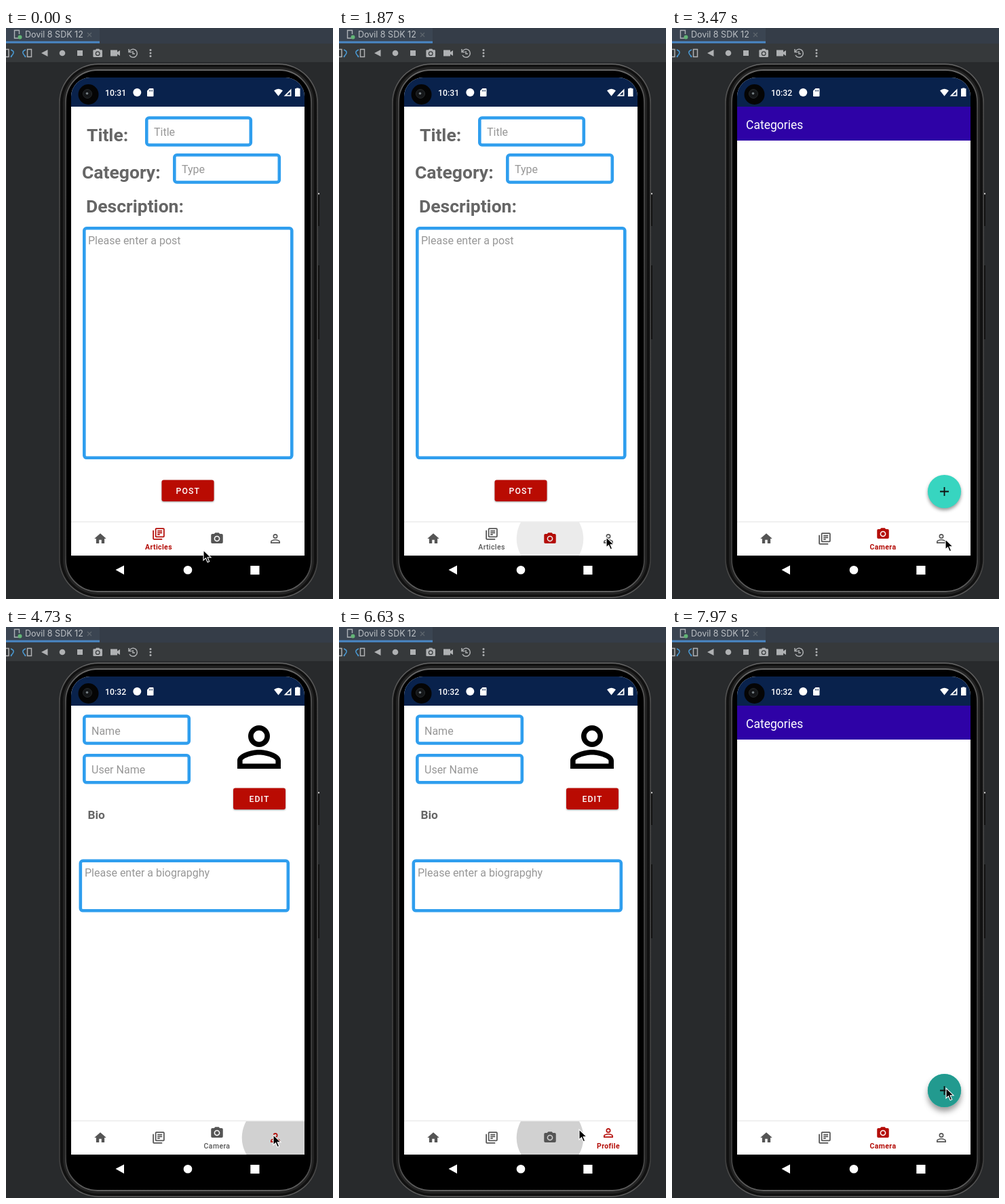
An HTML page for the animation above (8000 ms loop, 482 by 842 pixels).

```html
<!DOCTYPE html>
<html lang="en">
<head>
<meta charset="utf-8">
<title>Phone emulator</title>
<style>
  html, body { margin: 0; width: 100%; height: 100%; overflow: hidden; background: #282a2c; }
  svg { display: block; width: 100%; height: 100%; }
  text { font-family: Roboto, sans-serif; white-space: pre; }
  .heading { font-weight: 700; font-size: 26.5px; fill: #666; }
  .hint { font-size: 16px; fill: #979797; }
  .field { fill: none; stroke: #2f9eee; stroke-width: 4.6; }
  .button { fill: #b90b02; filter: drop-shadow(0 1.5px 1.2px #0006); }
  .button-text { font-weight: 500; font-size: 12.25px; letter-spacing: 1.09px; fill: #fff; }
  .label { font-size: 10.5px; letter-spacing: .38px; text-anchor: middle; }
</style>
</head>
<body>
<svg viewBox="0 0 482 842" preserveAspectRatio="none">
  <defs>
    <linearGradient id="rim" x1="0" y1="0" x2="0" y2="1">
      <stop offset="0" stop-color="#686868"/><stop offset=".08" stop-color="#484848"/>
      <stop offset=".93" stop-color="#3c3c3c"/><stop offset="1" stop-color="#606060"/>
    </linearGradient>
    <clipPath id="screenClip"><path d="M96 778V101a28 28 0 0 1 28-28H412a28 28 0 0 1 28 28V778z"/></clipPath>
    <clipPath id="navClip"><path d="M96 729H440V778H96z"/></clipPath>
    <clipPath id="fabClip"><circle cx="401.5" cy="683.5" r="24.6"/></clipPath>
    <path id="person" fill-rule="evenodd" d="M12 5.9a2.1 2.1 0 1 1 0 4.2a2.1 2.1 0 0 1 0-4.2m0 9c2.97 0 6.1 1.46 6.1 2.1v1.1H5.9V17c0-.64 3.13-2.1 6.1-2.1M12 4a4 4 0 1 0 0 8a4 4 0 0 0 0-8zm0 9c-2.67 0-8 1.34-8 4v3h16v-3c0-2.66-5.33-4-8-4z"/>
    <path id="home" d="M10 20v-6h4v6h5v-8h3L12 3 2 12h3v8z"/>
    <path id="articles" fill-rule="evenodd" d="M4 6H2v14a2 2 0 0 0 2 2h14v-2H4zM20 2H8a2 2 0 0 0-2 2v12a2 2 0 0 0 2 2h12a2 2 0 0 0 2-2V4a2 2 0 0 0-2-2zm0 14H8V4h12zM10 9h8v2h-8zm0 3h4v2h-4zm0-6h8v2h-8z"/>
    <path id="camera" fill-rule="evenodd" d="M9 2L7.17 4H4a2 2 0 0 0-2 2v12a2 2 0 0 0 2 2h16a2 2 0 0 0 2-2V6a2 2 0 0 0-2-2h-3.17L15 2zm3 5a5 5 0 1 1 0 10a5 5 0 0 1 0-10zm0 1.8a3.2 3.2 0 1 0 0 6.4a3.2 3.2 0 0 0 0-6.4z"/>
  </defs>

  <!-- Tool window -->
  <path fill="#282a2c" d="M0 0H482V842H0z"/>
  <path fill="#353d48" d="M0 0H482V23H0z"/>
  <path fill="#3b4552" d="M0 0H138V20H0z"/>
  <path fill="#4a87c5" d="M0 19.5H138V22.5H0z"/>
  <path fill="#36393b" d="M0 23H482V51H0z"/>
  <path fill="#252729" d="M0 50.5H482V51.5H0z"/>
  <path fill="none" stroke="#aeb3b8" stroke-width="1.4" d="M19 15H12.5V3.500H19.500V9"/>
  <circle cx="20.500" cy="13.500" r="3" fill="#62b476"/>
  <text x="28" y="14.200" style="font:12.5px Inter,sans-serif" fill="#bcc0c5">Dovil 8 SDK 12</text>
  <path stroke="#5e666e" stroke-width="1.2" d="M120 7l6 6m0-6l-6 6"/>
  <g fill="none" stroke="#afb1b3" stroke-width="1.5">
    <path d="M-2 31.500H4V42.500H-2M31.500 31.500H37.500V42.500H31.500z"/>
    <path stroke="#4a9ad4" d="M7 32q5 2 4 5t-4 5M29 32q-5 2-4 5t4 5M9 41l-2 2M27 41l2 2"/>
    <path d="M182 34.500a6 6 0 1 1 0 5.500M181 31v4.500h4.500M187 34v4h3"/>
  </g>
  <g fill="#afb1b3">
    <path d="M52 37l9.500-5V42zM105 33h8v8h-8zM154 32.500h10v3l4-2.500v8l-4-2.500v3h-10z"/>
    <circle cx="83" cy="37" r="4.300"/>
    <use href="#camera" transform="translate(127 29.500) scale(.68)"/>
    <circle cx="213" cy="32.500" r="1.500"/><circle cx="213" cy="37" r="1.500"/><circle cx="213" cy="41.500" r="1.500"/>
  </g>

  <!-- Phone body -->
  <path fill="#111" d="M459 242h3v50h-3zM459 350h3v109h-3z"/>
  <path fill="#bbb" d="M460 243h2v2.500h-2z"/>
  <rect x="78" y="52.500" width="382" height="788" rx="58" fill="url(#rim)"/>
  <rect x="79.800" y="54" width="378.400" height="785" rx="56" fill="#111"/>
  <rect x="84" y="57.500" width="370" height="778" rx="52" fill="#232323"/>
  <rect x="88" y="62" width="362" height="769" rx="47" fill="#000" stroke="url(#rim)" stroke-width="1.800"/>

  <g clip-path="url(#screenClip)">
    <path fill="#fff" d="M96 73H440V778H96z"/>
    <path fill="#09224c" d="M96 73H440V116H96z"/>

    <g id="articlesScreen">
      <text class="heading" x="119" y="167">Title:</text>
      <text class="heading" x="112" y="221.500">Category:</text>
      <text class="heading" x="118" y="272">Description:</text>
      <rect class="field" x="207.300" y="132.500" width="153.500" height="40" rx="3.500"/>
      <rect class="field" x="248.300" y="187.300" width="154.500" height="40.200" rx="3.500"/>
      <rect class="field" x="115.300" y="295.300" width="306" height="338.500" rx="3.500"/>
      <text class="hint" x="218" y="159">Title</text>
      <text class="hint" x="259" y="214">Type</text>
      <text class="hint" x="121" y="319.300">Please enter a post</text>
      <rect class="button" x="229.500" y="666.500" width="77" height="31.500" rx="3"/>
      <text class="button-text" x="250.500" y="687">POST</text>
    </g>

    <g id="categoriesScreen">
      <path fill="#2e02a6" d="M96 116H440V166H96z"/>
      <text x="109" y="148.500" font-size="17.500" fill="#fff">Categories</text>
      <circle id="fab" cx="401.500" cy="683.500" r="24.600" fill="#37d5c0"/>
      <circle id="fabRipple" cx="404" cy="681" fill="#229a8f" clip-path="url(#fabClip)"/>
      <path stroke="#111" stroke-width="1.800" d="M395 683.500h13M401.500 677v13"/>
    </g>

    <g id="profileScreen">
      <rect class="field" x="115.300" y="131.500" width="154.500" height="40" rx="3.500"/>
      <rect class="field" x="115.300" y="189.300" width="154.500" height="40" rx="3.500"/>
      <rect class="field" x="109.800" y="344.800" width="306" height="73.500" rx="3.500"/>
      <text class="hint" x="126" y="158.500">Name</text>
      <text class="hint" x="126" y="216.300">User Name</text>
      <text class="hint" x="116" y="368.300">Please enter a biograpghy</text>
      <text x="120.500" y="283" font-size="17.300" font-weight="700" fill="#666">Bio</text>
      <use href="#person" transform="translate(325 129) scale(4)"/>
      <rect class="button" x="335" y="237.500" width="77" height="31.500" rx="3"/>
      <text class="button-text" x="358.500" y="258">EDIT</text>
    </g>

    <path fill="#ececec" d="M96 727.500H440V729H96z"/>
    <path fill="#fff" d="M96 729H440V778H96z"/>
    <g clip-path="url(#navClip)"><circle id="ripple" cy="753"/></g>
    <g id="tabs"></g>
  </g>

  <!-- Status and system bars -->
  <circle cx="121.500" cy="98" r="15" fill="#050505"/>
  <circle cx="120" cy="97" r="6.500" fill="#151719" stroke="#26292c"/>
  <circle cx="119.500" cy="96.500" r="1.800" fill="#747c80"/>
  <text id="clock" x="146" y="99.500" font-size="12.250" font-weight="500" fill="#fff"></text>
  <g fill="#fff">
    <circle cx="193.300" cy="95" r="6"/>
    <path fill-rule="evenodd" d="M211.500 89H216.500q1 0 1 1V100q0 1-1 1H209q-1 0-1-1V92.500zM211 91.500v2h1v-2zm2 0v2h1v-2zm2 0v2h1v-2z"/>
    <path d="M395 92.300q6.500-5 13 0L401.500 100.500zM420.500 89.500V100.500H409.500zM428 89.300V88.500h3.500v.800h2V101h-7.500V89.300z"/>
    <path fill="#09224c" d="M418.700 94V98.800H413.900z"/>
    <path d="M161.500 799L174 792.500V806zM360.300 793H373.500V806H360.300z"/>
    <circle cx="268" cy="799.300" r="6.300"/>
  </g>

  <path id="cursor" d="M0 0V15l3.500-3.300 2.600 6.100 2.600-1.100-2.600-6H11z" fill="#000" stroke="#fff" stroke-width="1.100"/>
</svg>

<script>
const LOOP = 8000;
const byId = id => document.getElementById(id);
const clamp = x => Math.max(0, Math.min(1, x));
const progress = (t, start, duration) => clamp((t - start) / duration);
const smooth = x => x * x * (3 - 2 * x);
const lastStarted = (events, t) => events.findLastIndex(e => e.at <= t);

const tabs = [["home", "Home"], ["articles", "Articles"], ["camera", "Camera"], ["person", "Profile"]]
  .map(([icon, label], i) => ({ icon, label, x: 139 + 86 * i }));
const selections = [{ at: -500, tab: 1 }, { at: 1860, tab: 2 }, { at: 4720, tab: 3 }, { at: 6740, tab: 2 }];
const screens = [
  { at: 0, id: "articlesScreen" }, { at: 1915, id: "categoriesScreen" },
  { at: 4710, id: "profileScreen" }, { at: 6760, id: "categoriesScreen" }
];
const ripples = [
  { at: 1620, release: 1780, tab: 2 }, { at: 4500, release: 4770, tab: 3 }, { at: 6420, release: 6690, tab: 2 }
];
// time, x, y of the pointer tip
const pointerPath = [
  [0, 291, 770], [500, 291, 770], [1150, 310, 757], [1620, 310, 757], [1860, 394, 751],
  [2600, 398, 752], [3300, 403, 754], [3600, 403, 754], [4200, 394, 749], [4900, 394, 749],
  [5600, 335, 747], [5750, 335, 747], [6050, 318, 751], [6420, 318, 751], [6620, 354, 741],
  [6750, 354, 741], [7400, 404, 680], [LOOP, 404, 680]
];

byId("tabs").innerHTML = tabs.map(({ icon, label, x }) =>
  `<g><use href="#${icon}"/><text class="label" x="${x}" y="769">${label}</text></g>`).join("");
tabs.forEach((tab, i) => [tab.iconNode, tab.labelNode] = byId("tabs").children[i].children);

function drawTabs(t) {
  const index = lastStarted(selections, t);
  const { at, tab: current } = selections[index];
  const previous = selections[index - 1]?.tab;
  const p = smooth(progress(t, at + 20, 115));
  tabs.forEach((tab, i) => {
    const active = i === current;
    const lift = active ? p : i === previous ? 1 - p : 0;
    const color = active ? "#b40d08" : "#555";
    tab.iconNode.setAttribute("transform", `translate(${tab.x - 10.5} ${742.5 - 7 * lift}) scale(.875)`);
    tab.iconNode.setAttribute("fill", color);
    tab.labelNode.setAttribute("fill", color);
    tab.labelNode.setAttribute("font-weight", active ? 700 : 500);
    tab.labelNode.setAttribute("opacity", lift);
  });
}

function drawRipple(t) {
  const event = ripples[lastStarted(ripples, t)];
  const node = byId("ripple");
  if (!event) return node.setAttribute("opacity", 0);
  const grow = smooth(progress(t, event.at, 200));
  const fade = progress(t, event.at, 75) * (1 - progress(t, event.release, 160));
  node.setAttribute("cx", tabs[event.tab].x);
  node.setAttribute("r", 18 + 31.3 * grow);
  node.setAttribute("opacity", .18 * fade);
}

function drawFab(t) {
  const press = smooth(progress(t, 7700, 200));
  byId("fab").style.filter = `drop-shadow(0 ${3 + 3 * press}px ${2.5 + 2 * press}px #0006)`;
  byId("fabRipple").setAttribute("r", 30 * press);
}

function drawPointer(t) {
  const next = pointerPath.findIndex(([at]) => at > t);
  const [t0, x0, y0] = pointerPath[next - 1], [t1, x1, y1] = pointerPath[next];
  const p = smooth((t - t0) / (t1 - t0));
  byId("cursor").setAttribute("transform", `translate(${x0 + (x1 - x0) * p} ${y0 + (y1 - y0) * p})`);
}

function draw(t) {
  const visible = screens[lastStarted(screens, t)].id;
  for (const { id } of screens) byId(id).style.display = id === visible ? "" : "none";
  byId("clock").textContent = t < 2600 ? "10:31" : "10:32";
  drawTabs(t);
  drawRipple(t);
  drawFab(t);
  drawPointer(t);
}

const start = performance.now();
function tick() {
  draw((performance.now() - start) % LOOP);
  requestAnimationFrame(tick);
}
tick();
</script>
</body>
</html>
```
